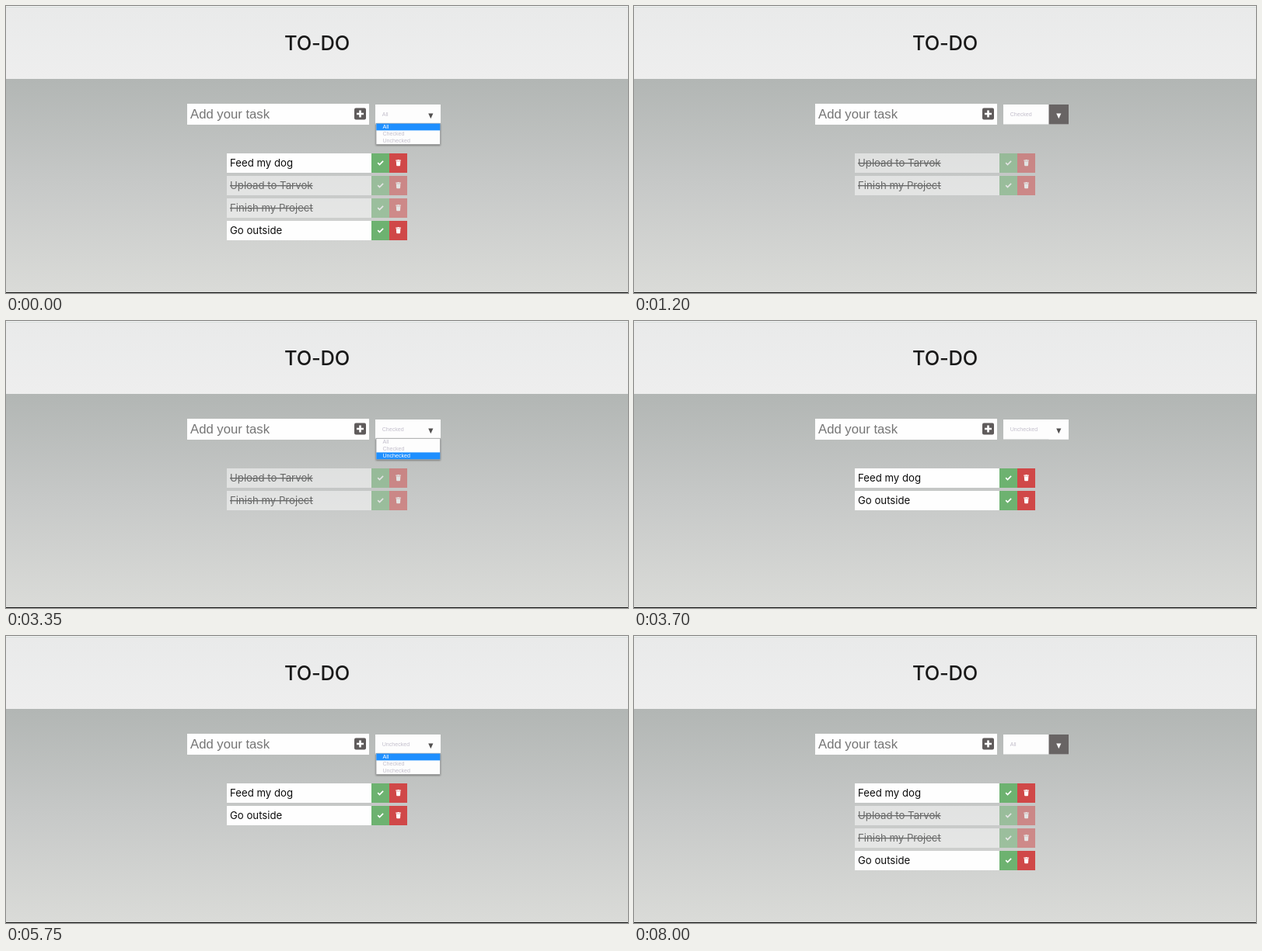
An HTML page for the animation above (8.05 s loop, 800 px wide and 370 px high).

```html
<!DOCTYPE html>
<html lang="en">
<head>
<meta charset="utf-8">
<title>To-do</title>
<style>
  html, body { margin: 0; width: 100%; height: 100%; overflow: hidden; }
  svg { display: block; width: 800px; height: 370px; }
  .title { font: 500 25.4px Inter, sans-serif; fill: #191919; letter-spacing: -.2px; text-anchor: middle; }
  .task { font: 13.2px Inter, sans-serif; fill: #0c0c0c; }
  .done { opacity: .5; }
  .done .task { text-decoration: line-through; }
  .hint { font: 16.7px "Liberation Sans", Arial, sans-serif; fill: #757575; }
  .small { font: 7.1px "Liberation Sans", Arial, sans-serif; fill: #c3bfcc; }
  .small.on { fill: #fff; }
</style>
</head>
<body>
<svg viewBox="0 0 800 370">
  <defs>
    <linearGradient id="head" x2="0" y2="1">
      <stop stop-color="#e9eaea"/><stop offset="1" stop-color="#eeeeee"/>
    </linearGradient>
    <linearGradient id="page" x2="0" y2="1">
      <stop stop-color="#b2b6b4"/><stop offset=".5" stop-color="#c7c9c8"/><stop offset="1" stop-color="#dadbd8"/>
    </linearGradient>
    <filter id="shadow" x="-10%" y="-20%" width="120%" height="150%">
      <feDropShadow dx="0" dy="1" stdDeviation="1" flood-opacity=".4"/>
    </filter>
  </defs>

  <rect width="800" height="94" fill="url(#head)"/>
  <rect width="800" height="1" fill="#f3f4f4"/>
  <rect y="1" width="800" height="1" fill="#d9dfdd"/>
  <rect y="94" width="800" height="275" fill="url(#page)"/>
  <rect y="369" width="800" height="1" fill="#161616"/>
  <text class="title" x="400" y="57">TO-DO</text>

  <rect x="233" y="126" width="234" height="27" fill="#fefefe"/>
  <text class="hint" x="237" y="145">Add your task</text>
  <rect x="448" y="131.5" width="15" height="15" rx="2" fill="#5f5b5b"/>
  <path d="M455.5 134.5v9M451 139h9" stroke="#fff" stroke-width="2.6"/>

  <rect x="475" y="127" width="84" height="25.5" fill="#fdfdfd"/>
  <text class="small" id="choice" x="483.7" y="142"></text>
  <rect id="button" x="533.5" y="127" width="25.5" height="25.5"/>
  <path id="arrow" d="M543.2 138.6h6.2l-3.1 6.6z"/>

  <g id="list"></g>
  <g id="menu">
    <rect x="476" y="151.3" width="82.5" height="27.2" fill="#fdfdfd" stroke="#8f9192" stroke-width=".7" filter="url(#shadow)"/>
    <rect id="mark" x="476.3" width="82" height="8.8" fill="#1e8fff"/>
  </g>
</svg>
<script>
const LOOP = 8050, FADE = 250;
const options = ["All", "Checked", "Unchecked"];
const tasks = [
  ["Feed my dog", false],
  ["Upload to Tarvok", true],
  ["Finish my Project", true],
  ["Go outside", false]
];

// [time, selected option, highlighted option (-1: menu closed)]
const steps = [
  [0, 0, 0], [400, 0, 1], [850, 1, -1],
  [2900, 1, 1], [3250, 1, 2], [3700, 2, -1],
  [5150, 2, 2], [5450, 2, 1], [5650, 2, 0], [6200, 0, -1]
];
// [time, 1: arrow button lit by the pointer, 0: dark]
const hovers = [[-FADE, 1], [850, 0], [2550, 1], [3700, 0], [4778, 1], [6200, 0]];

const $ = id => document.getElementById(id);
const last = (table, t) => table.filter(row => row[0] <= t).pop();
const mix = (a, b, p) => `rgb(${a.map((v, i) => Math.round(v + (b[i] - v) * p))})`;
const DARK = [104, 100, 100], LIGHT = [253, 253, 253], INK = [82, 80, 80];

// Solves the standard CSS "ease" curve.
function ease(x) {
  let lo = 0, hi = 1, s = .5;
  for (let i = 0; i < 20; i++) {
    s = (lo + hi) / 2;
    const bx = 3 * (1 - s) ** 2 * s * .25 + 3 * (1 - s) * s * s * .25 + s ** 3;
    if (bx < x) lo = s; else hi = s;
  }
  return 3 * (1 - s) ** 2 * s * .1 + 3 * (1 - s) * s * s + s ** 3;
}

const rows = tasks.map(([label, done]) => {
  $("list").insertAdjacentHTML("beforeend", `<g class="${done ? "done" : ""}">
    <rect width="186" height="25" fill="#fefefe"/>
    <rect x="186" width="23" height="25" fill="#6db270"/>
    <rect x="209" width="23" height="25" fill="#d04848"/>
    <text class="task" x="4" y="17">${label}</text>
    <path d="M194.2 12.2l2.3 2.4 4.6-4.8" fill="none" stroke="#fff" stroke-width="1.7"/>
    <path d="M217.3 8.6h2l.5-.7h1.6l.5.7h2v1.2h-6.6zM217.8 10.3h5.6l-.4 5.2q-.1.7-.8.7h-3.2q-.7 0-.8-.7z" fill="#fff"/>
  </g>`);
  return $("list").lastElementChild;
});

const items = options.map((label, i) => {
  $("menu").insertAdjacentHTML("beforeend",
    `<text class="small" x="484.5" y="${158.2 + i * 8.9}">${label}</text>`);
  return $("menu").lastElementChild;
});

function draw(t) {
  const [, selected, mark] = last(steps, t);
  $("choice").textContent = options[selected];

  let slot = 0;
  rows.forEach((row, i) => {
    const shown = selected === 0 || tasks[i][1] === (selected === 1);
    row.style.display = shown ? "" : "none";
    if (shown) row.setAttribute("transform", `translate(284 ${190 + 29 * slot++})`);
  });

  $("menu").style.display = mark < 0 ? "none" : "";
  $("mark").setAttribute("y", 151.6 + Math.max(mark, 0) * 8.9);
  items.forEach((item, i) => item.classList.toggle("on", i === mark));

  const [start, lit] = last(hovers, t);
  const p = ease(Math.min(1, (t - start) / FADE));
  const glow = lit ? p : 1 - p;
  $("button").setAttribute("fill", mix(DARK, LIGHT, glow));
  $("arrow").setAttribute("fill", mix(LIGHT, INK, glow));
}

const begin = performance.now();
function tick() {
  draw((performance.now() - begin) % LOOP);
  requestAnimationFrame(tick);
}
tick();
</script>
</body>
</html>
```
